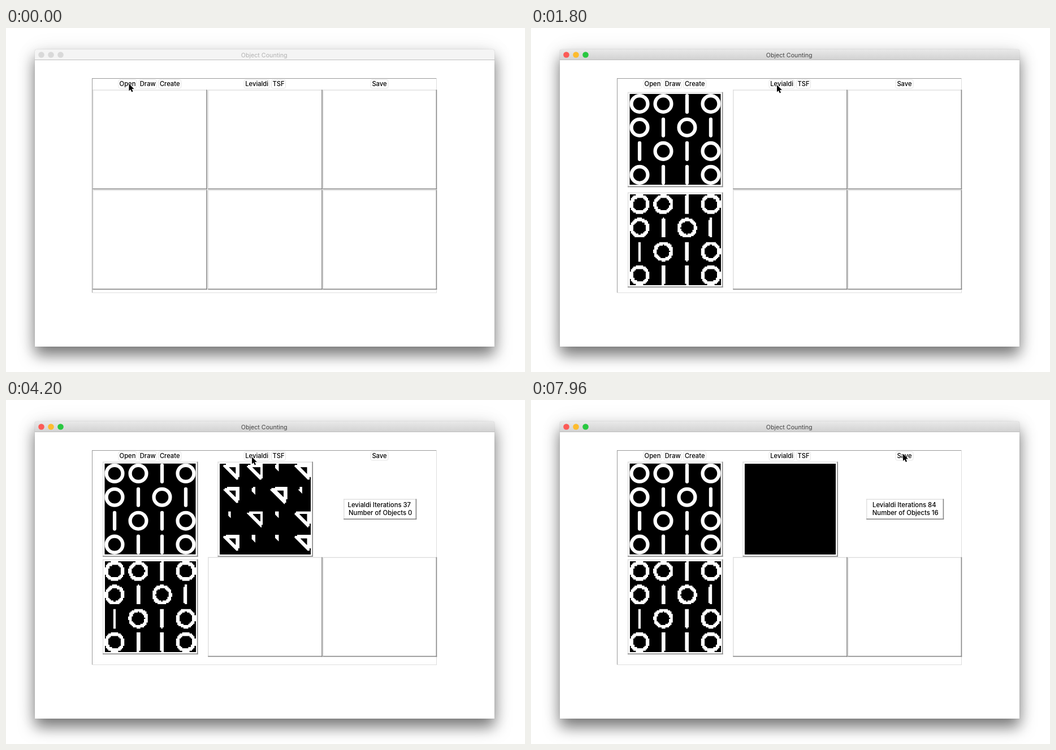
Write an HTML page with a canvas that moves like this. It is 918x610 px and loops after 8000 ms.

```html
<!DOCTYPE html>
<html lang="en">
<head>
<meta charset="utf-8">
<title>Object Counting</title>
<style>
html, body { margin: 0; width: 100%; height: 100%; overflow: hidden; background: #fff; }
#stage { position: relative; width: 918px; height: 610px; overflow: hidden; }
#stage > * { position: absolute; left: 0; top: 0; }
#stage > #win {
  left: 51px; top: 38px; width: 813px; height: 527px; background: #fff; border-radius: 4px 4px 0 0;
  box-shadow: 0 0 1px rgba(0,0,0,.45), 0 15px 27px rgba(0,0,0,.52), 0 0 38px rgba(0,0,0,.07);
}
#win.idle { box-shadow: 0 0 1px rgba(0,0,0,.4), 0 7px 16px rgba(0,0,0,.3), 0 0 28px rgba(0,0,0,.05); }
text { font-family: Inter, Roboto, sans-serif; white-space: pre; }
</style>
</head>
<body>
<div id="stage">
  <div id="win"></div>
  <canvas id="table" width="918" height="610"></canvas>
  <svg id="ui" width="918" height="610" viewBox="0 0 918 610">
    <defs>
      <linearGradient id="bar" x2="0" y2="1"><stop stop-color="#e9e9e9"/><stop offset="1" stop-color="#d1d1d1"/></linearGradient>
      <clipPath id="below"><path d="M0 57H918V610H0Z"/></clipPath>
      <filter id="soft" x="-10%" y="-10%" width="120%" height="125%">
        <feDropShadow dx="0" dy="3" stdDeviation="5" flood-opacity=".4"/>
      </filter>
    </defs>
  </svg>
</div>
<script>
const LOOP = 8000;
const $ = id => document.getElementById(id);
const ui = $('ui'), ctx = $('table').getContext('2d');

function el(tag, attrs, parent = ui) {
  const node = document.createElementNS('http://www.w3.org/2000/svg', tag);
  for (const k in attrs) node.setAttribute(k, attrs[k]);
  return parent.appendChild(node);
}
function label(parent, x, y, str, size, fill = '#111', attrs = {}) {
  const node = el('text', { x, y, 'font-size': size, fill, ...attrs }, parent);
  node.textContent = str;
  return node;
}
const box = (parent, x, y, width, height, fill, attrs = {}) =>
  el('rect', { x, y, width, height, fill, ...attrs }, parent);
const line = (parent, d, stroke, width = 1, attrs = {}) =>
  el('path', { d, stroke, fill: 'none', 'stroke-width': width, ...attrs }, parent);
const MID = { 'text-anchor': 'middle' };

// Keyframe table lookup: rows are [time, value, value...]
function at(table, t, ease = p => p) {
  const i = table.findIndex(row => row[0] > t);
  if (i === 0) return table[0].slice(1);
  if (i < 0) return table[table.length - 1].slice(1);
  const a = table[i - 1], b = table[i], p = ease((t - a[0]) / (b[0] - a[0]));
  return a.slice(1).map((v, k) => v + (b[k + 1] - v) * p);
}
const smooth = p => p * p * (3 - 2 * p);

// ---- Window chrome and buttons ----
const bar = el('path', { d: 'M51 57V42Q51 38 55 38H860Q864 38 864 42V57Z' });
line(ui, 'M51 56.5H864', '#bdbdbd');
const lights = [62.5, 79.5, 96.5].map(cx => el('circle', { cx, cy: 47.5, r: 5.3 }));
const title = label(ui, 456.7, 51.5, 'Object Counting', 10.7, '#444', MID);
[['Open', 215, 32], ['Draw', 250.8, 31], ['Create', 289.7, 40], ['Levialdi', 443.7, 45],
 ['TSF', 482, 25], ['Save', 660.5, 31]].forEach(([name, x, w]) => {
  box(ui, x - w / 2, 91.5, w, 15.5, '#fff', { rx: 3, stroke: '#e2e2e2', 'stroke-width': .9 });
  label(ui, x, 102.7, name, 11.2, '#000', { ...MID, 'font-weight': 500 });
});
const result = el('g', { 'font-weight': 500 });
const lineA = label(result, 660.3, 190, '', 11.3, '#000', MID);
const lineB = label(result, 662.2, 203.7, '', 11.3, '#000', MID);

// ---- File sheet ----
const clip = el('g', { 'clip-path': 'url(#below)' });
const sheet = el('g', {}, clip);
const GREY = '#666';
box(sheet, 92.5, 57, 730, 379, '#ececec', { filter: 'url(#soft)', stroke: '#bbb', 'stroke-width': .6 });
box(sheet, 93, 90, 130, 312, '#e8e8e8');
box(sheet, 223.5, 90, 599, 312, '#fff');
box(sheet, 223.5, 90, 599, 18, '#f6f6f6');
line(sheet, 'M93 89.5H822M223.5 90V402M93 402.5H822', '#cfcfcf', .9);
line(sheet, 'M223 108.3H822M491.5 91V107M642.5 91V107M725.5 91V107', '#d2d2d2', .9);

const tool = (x, w, fill = '#fdfdfd') =>
  box(sheet, x, 63, w, 19.5, fill, { rx: 3.5, stroke: '#cdcdcd', 'stroke-width': .8 });
[[99, 34], [139, 44], [189, 71], [266, 34], [376, 163]].forEach(b => tool(...b));
tool(643, 33, '#f3f3f3'); tool(682, 33, '#f3f3f3'); tool(720, 96);
box(sheet, 212, 63, 24, 19.5, '#666');
line(sheet, 'M161.3 63V82M236 63V82M212 63V82', '#d0d0d0', .8);
line(sheet, 'M110 68.5H123V77.5H110ZM114.5 68.5V77.5M111.5 71H113M111.5 73H113', '#555');
line(sheet, 'M152.5 68.5L147.5 73L152.5 77.5M170 68.5L175 73L170 77.5', '#888', 1.2);
line(sheet, 'M218.5 69H230M218.5 72H230M218.5 75H230M218.5 78H230', '#fff', 1.1);
line(sheet, 'M242 69H254V77.5H242ZM246 69V77.5M250 69V77.5', '#555');
[[196.5, 2, 4.8, 3.4], [273, 3, 4.5, 2.8]].forEach(([x0, n, gap, s]) => {
  for (let i = 0; i < n * 2; i++)
    box(sheet, x0 + i % n * gap, 69 + Math.floor(i / n) * 4.8, s, s, 'none', { stroke: '#555', 'stroke-width': .9 });
});
line(sheet, 'M288.5 71.8L291 74.3L293.5 71.8M528.5 71L531 68L533.5 71M528.5 75L531 78L533.5 75M629.5 97.5L632 100.5L634.5 97.5', '#444', 1.1);
line(sheet, 'M657 71H655V78.5H663.5V71H661.5M659.3 75V67M657 69L659.3 66.7L661.6 69', '#999');
line(sheet, 'M692 73L695.5 69H705V77H695.5Z', '#aaa');
line(sheet, 'M742.5 75.5L745.5 78.5M743.5 72.5a3.8 3.8 0 1 0 -7.6 0a3.8 3.8 0 1 0 7.6 0', '#555', 1.1);
el('path', { d: 'M381 68.5h5l1.5 1.5h7v8.5h-13.5Z', fill: '#6db9e8' }, sheet);
label(sheet, 398, 76.8, 'Test Images', 10.6);
label(sheet, 749.5, 76.8, 'Search', 10.6, '#8a8a8a');
[['Name', 228.5], ['Date Modified', 500.5], ['Size', 652.5], ['Kind', 734]].forEach(([s, x]) =>
  label(sheet, x, 102, s, 9.1, '#222', { 'font-weight': s[0] === 'D' ? 600 : 400 }));

[['Favorites', 105], ['Devices', 349.5], ['Tags', 395.2]].forEach(([s, y]) =>
  label(sheet, 100, y, s, 9.2, '#777', { 'font-weight': 500 }));
const FOLDER = 'M-7 -4.5h5l1.5 1.5h7.5v8h-14ZM-7 -1.5h14';
const ROUND = 'M6.5 0a6.5 6.5 0 1 0 -13 0a6.5 6.5 0 1 0 13 0';
[['Recents', 'M-5.5 -5.5h11v10h-11ZM-7 6h14M-3 -2.5h6M-3 0h6'],
 ['homefolder', 'M-7 0L0 -6.5L7 0M-5 -1V6H5V-1M-1.5 6V1.5H1.5V6'],
 ['Online Drive', 'M-4.5 4.5h9a3 3 0 0 0 .5 -6a4 4 0 0 0 -7.5 -1.5a3 3 0 0 0 -3 2.5a2.6 2.6 0 0 0 1 5'],
 ['Applications', 'M-5.5 6L0 -6L5.5 6M-7 2.5H7'],
 ['Desktop', 'M-7 -5h14v10h-14ZM-7 2.5h14M-7 3.8h14'],
 ['Documents', 'M-6 -3.5h7v9.5h-7ZM-2.5 -3.5v-2.5h5l2.5 2.5v7h-4M-4 0h3M-4 2.5h3'],
 ['Downloads', ROUND], ['Painting Shelf...', ROUND], ['Storage', FOLDER], ['DataShed - me...', FOLDER],
 ['Office Disc', ROUND + 'M2 0a2 2 0 1 0 -4 0a2 2 0 1 0 4 0']].forEach(([s, d], i) => {
  const y = i < 10 ? 120.5 + 22 * i : 364.5;
  const solid = i === 6 || i === 7;
  const fill = solid ? GREY : i === 4 || i > 7 ? '#c9c9c9' : 'none';
  el('path', { d, fill, stroke: GREY, transform: `translate(115 ${y})` }, sheet);
  if (i === 6) line(sheet, `M115 ${y - 4}v7M112 ${y}l3 3.3l3 -3.3`, '#eee', 1.6);
  label(sheet, 127.7, y + 3.9, s, 10.7, '#222');
});

const FILES = `abc.png|5 March 2019 00:32|10 KB|#111|#444
1dot.png|26 February 2019 12:23|1 KB|#111|#fff
shapes1.jpg|20 February 2019 16:29|26 KB|#fff|#222
shapes.jpg|20 February 2019 13:52|22 KB|#fff|#111
2.jpg|20 February 2019 11:37|23 KB|#111|#fff
cini.png|20 February 2019 11:29|530 KB|#b9cbe0|#6287b2
9000100020003.jpg|20 February 2019 11:25|112 KB|#8797a8|#56687c
windmill.jpg|20 February 2019 00:15|231 KB|#2c251d|#806038
91.png|19 February 2019 20:18|1 KB|#fff|#222
NCC16_ITER84.png|19 February 2019 12:56|7 KB|#111|#ddd
winter-coasts-world-...-100-photos-2018.jpg|18 February 2019 22:00|519 KB|#3a302b|#a08672
NCC4_ITER15.png|15 February 2019 23:55|197 bytes|#fff|#111
NCC4_ITER128.png|15 February 2019 06:58|1 KB|#111|#555
NCC5_ITER48.png|14 February 2019 18:18|1 KB|#111|#fff`.split('\n').map(r => r.split('|'));
for (let i = 0; i < 18; i += 2) box(sheet, 224, 110.3 + i * 16.1, 598.5, 16.1, '#f3f3f3');
const picked = box(sheet, 224, 110.3, 598.5, 16.1, '#1164d8');
const firstRow = [];
FILES.forEach(([name, date, size, back, fore], row) => {
  const y = 118.3 + row * 16.1, base = y + 3.7;
  box(sheet, 247, y - 5.3, 10.6, 10.6, back, { stroke: '#777', 'stroke-width': .5 });
  if (row === 1) box(sheet, 250.3, y - 2, 4, 4, fore);
  else for (let k = 0; k < 6; k++) {
    const a = Math.abs(Math.sin(row * 7.3 + k * 3.1)), b = Math.abs(Math.sin(row * 2.7 + k * 5.9));
    box(sheet, 248 + a * 6, y - 4 + b * 5.5, 2.5, 2, fore);
  }
  const parts = [
    label(sheet, 262.5, base, name, 10.2),
    label(sheet, 499, base, date, 10.5, '#808080'),
    label(sheet, 715, base, size, 10.2, '#808080', { 'text-anchor': 'end' }),
    label(sheet, 733, base, (name.endsWith('png') ? 'PNG' : 'JPEG') + ' image', 10.1, '#808080')
  ];
  if (!row) firstRow.push(...parts);
});
[['Cancel', 677], ['Open', 750]].forEach(([s, x], i) =>
  box(sheet, x, 412, 65, 17, i ? '#f4f4f4' : '#fff', { rx: 3.5, stroke: i ? '#dadada' : '#c2c2c2', 'stroke-width': .8 }));
label(sheet, 709.5, 424.3, 'Cancel', 10.7, '#111', MID);
const openText = label(sheet, 782.5, 424.3, 'Open', 10.7, '#b5b5b5', MID);

const cursor = el('path', {
  d: 'M0 0V12.6L2.9 9.9L4.9 14.5L7 13.6L5 9.1H9Z',
  fill: '#000', stroke: '#fff', 'stroke-width': 1, 'paint-order': 'stroke', 'stroke-linejoin': 'round'
});

// ---- Binary picture and its shrinking towards the top right ----
const W = 222, S = W + 2, LAST = 84, SHOWN = 161;
const PATTERN = ['OOIO', 'OIOI', 'IOIO', 'OIIO'];
const RADIUS = 24.2, PITCH = (W - 2 * RADIUS) / 3, PEN = 4.3;

function inkAt(x, y) {
  const col = Math.min(3, Math.max(0, Math.round((x - RADIUS) / PITCH)));
  const row = Math.min(3, Math.max(0, Math.round((y - RADIUS) / PITCH)));
  const dx = x - RADIUS - col * PITCH, dy = y - RADIUS - row * PITCH;
  return PATTERN[row][col] === 'O'
    ? Math.abs(Math.hypot(dx, dy) - RADIUS + PEN) <= PEN
    : Math.hypot(dx, Math.max(Math.abs(dy) - RADIUS + PEN, 0)) <= PEN;
}
function shrink({ grid, count }) {
  const next = new Uint8Array(S * S);
  for (let y = 1; y <= W; y++) for (let x = 1; x <= W; x++) {
    const i = y * S + x, left = grid[i - 1], down = grid[i + S], diag = grid[i + S - 1];
    if (!grid[i]) { next[i] = left & down; continue; }
    next[i] = left | down | diag;
    if (!next[i] && !(grid[i + 1] | grid[i - S] | grid[i - S - 1] | grid[i - S + 1] | grid[i + S + 1])) count++;
  }
  return { grid: next, count };
}
const first = new Uint8Array(S * S);
const coarse = v => Math.floor(v / 3) * 3 + 1.5;
for (let y = 0; y < W; y++) for (let x = 0; x < W; x++)
  first[(y + 1) * S + x + 1] = inkAt(coarse(x), coarse(y)) ? 1 : 0;
const states = [{ grid: first, count: 0 }];
while (states.length < LAST) states.push(shrink(states[states.length - 1]));
states.push({ grid: new Uint8Array(S * S), count: 16 });

function bitmap() {
  const c = document.createElement('canvas');
  c.width = c.height = W;
  return c;
}
function paint(canvas, grid) {
  const g = canvas.getContext('2d'), img = g.createImageData(W, W);
  const px = new Uint32Array(img.data.buffer);
  for (let y = 0; y < W; y++) for (let x = 0; x < W; x++)
    px[y * W + x] = grid[(y + 1) * S + x + 1] ? 0xffffffff : 0xff000000;
  g.putImageData(img, 0, 0);
}
const binary = bitmap(), shrinking = bitmap();
paint(binary, first);
let painted = -1;

// ---- Table drawing ----
function rect(x, y, w, h, color) { ctx.fillStyle = color; ctx.fillRect(x, y, w, h); }
function relief(x, y, w, h) {
  rect(x, y, w, h, '#fff');
  rect(x, y, w, 1.2, '#d9d9d9');
  rect(x, y, 1.2, h, '#d9d9d9');
  rect(x + w - 1.6, y, 1.6, h, '#858585');
  rect(x, y + h - 1.6, w, 1.6, '#858585');
}
function picture(x, y, source) {
  relief(x, y, 168.5, 168.5);
  ctx.save();
  ctx.translate(x + 3.5, y + 3.2);
  if (source) ctx.drawImage(source, 0, 0, SHOWN, SHOWN);
  else {
    rect(0, 0, SHOWN, SHOWN, '#000');
    ctx.scale(SHOWN / W, SHOWN / W);
    ctx.strokeStyle = '#fff';
    ctx.lineWidth = PEN * 2;
    ctx.lineCap = 'round';
    PATTERN.forEach((cells, r) => [...cells].forEach((cell, c) => {
      const cx = RADIUS + c * PITCH, cy = RADIUS + r * PITCH, k = RADIUS - PEN;
      ctx.beginPath();
      if (cell === 'O') ctx.arc(cx, cy, k, 0, 7);
      else { ctx.moveTo(cx, cy - k); ctx.lineTo(cx, cy + k); }
      ctx.stroke();
    }));
  }
  ctx.restore();
}
function drawTable(loaded, n) {
  ctx.clearRect(0, 0, 918, 610);
  rect(152, 89, 610, 1, '#989898');
  rect(152, 89, 1, 381, '#989898');
  rect(761, 89, 1, 381, '#dedede');
  rect(152, 469, 610, 1, '#dedede');
  const top = n ? 109.5 : 113.7, low = n ? 282.6 : 291.6;
  const empty = (col, y) => relief([153.5, 357.3, 560.5][col], y, col === 2 ? 201.7 : 202.5, 176.7);
  const rowA = 109.5, rowB = n ? 278.7 : 287.3;
  if (loaded) { picture(171, top); picture(171, low, binary); }
  else { empty(0, rowA); empty(0, rowB); }
  if (n) {
    if (painted !== n) { paint(shrinking, states[n].grid); painted = n; }
    picture(374.5, top, shrinking);
    const wide = states[n].count > 9 ? 137 : 129;
    relief(661.7 - wide / 2, 175.5, wide, 36.5);
  } else { empty(1, rowA); empty(2, rowA); }
  empty(1, rowB);
  empty(2, rowB);
}

// ---- Timeline ----
const POINTER = [[0, 217.5, 99], [240, 217.5, 99], [600, 253.5, 199], [680, 253.5, 199], [880, 262, 118],
  [1280, 262, 118], [1700, 435, 101], [7120, 435, 101], [7760, 658, 95.5]];
const SLIDE = [[120, 0], [360, 1], [1080, 1], [1260, 0]];
const STEPS = [[1860, 0], [3160, 21.4], [4200, 37.4], [6120, 70.4], [6920, LAST]];

function render(t) {
  const active = t >= 120, loaded = t >= 1280, slid = at(SLIDE, t, smooth)[0];
  const n = Math.floor(at(STEPS, t)[0]), chosen = t >= 900;
  const [x, y] = at(POINTER, t, smooth);

  $('win').className = active ? '' : 'idle';
  bar.setAttribute('fill', active ? 'url(#bar)' : '#f4f4f4');
  title.setAttribute('fill', active ? '#444' : '#b2b2b2');
  ['#fc5b57', '#fdbc2e', '#28c840'].forEach((c, i) =>
    lights[i].setAttribute('fill', !active ? '#d9d9d9' : !i && slid ? '#cdcdcd' : c));

  clip.style.display = slid ? '' : 'none';
  sheet.setAttribute('transform', `translate(0 ${(slid - 1) * 385})`);
  picked.style.display = chosen ? '' : 'none';
  firstRow.forEach((node, i) => node.setAttribute('fill', chosen ? '#fff' : i ? '#808080' : '#111'));
  openText.setAttribute('fill', chosen ? '#111' : '#b5b5b5');

  drawTable(loaded, n);
  result.style.display = n ? '' : 'none';
  lineA.textContent = 'Levialdi Iterations ' + n;
  lineB.textContent = 'Number of Objects ' + states[n].count;
  cursor.setAttribute('transform', `translate(${x} ${y})`);
}

const start = performance.now();
function tick() {
  render((performance.now() - start) % LOOP);
  requestAnimationFrame(tick);
}
tick();
</script>
</body>
</html>
```
